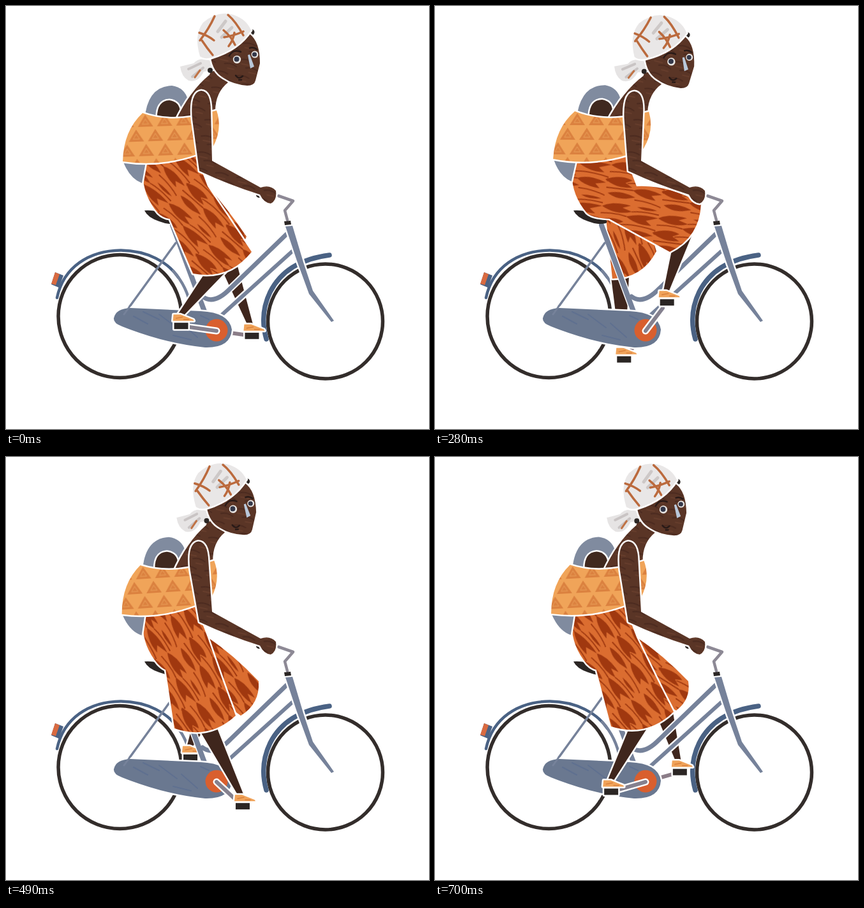
An HTML page that plays this animation: 663x664 px, repeating every 770 ms.

```html
<!DOCTYPE html>
<html lang="en">
<head>
<meta charset="utf-8">
<title>Cyclist</title>
<style>
  html, body { margin: 0; width: 100%; height: 100%; overflow: hidden; background: #fff; }
  svg { display: block; width: 100%; height: 100%; }
  .cut { stroke: #fff; stroke-width: 5; stroke-linejoin: round; paint-order: stroke; }
  .line { fill: none; stroke-linecap: round; stroke-linejoin: round; }
  .steel { stroke: #76829a; }
  .guard { stroke: #4a6284; }
  .black { fill: #2b2624; }
  .skin { fill: url(#skin); }
  .calf { fill: #3f261d; }
  .shoe { fill: #f0a35a; }
</style>
</head>
<body>
<svg viewBox="0 0 663 664">
  <defs>
    <pattern id="skin" width="34" height="26" patternUnits="userSpaceOnUse" patternTransform="rotate(12)">
      <path fill="#5a3526" d="M0 0H34V26H0Z"/>
      <path class="line" stroke="#4b2a1f" stroke-width="2" d="M2 6Q12 2 22 6M14 17Q24 13 33 18"/>
      <path class="line" stroke="#663d2c" stroke-width="2" d="M6 12H18M20 23H30"/>
    </pattern>
    <pattern id="tri" width="30" height="46" patternUnits="userSpaceOnUse" patternTransform="translate(203 170) rotate(-2)">
      <path fill="#f0a459" d="M0 0H30V46H0Z"/>
      <path fill="#db813f" d="M3 20L15 1L27 20ZM-12 43L0 24L12 43ZM18 43L30 24L42 43Z"/>
      <path class="line" stroke="#e59550" stroke-width="1.3" d="M10 16L15 8L20 16ZM-5 39L0 31L5 39ZM25 39L30 31L35 39Z"/>
    </pattern>
    <pattern id="nearCloth" width="90" height="66" patternUnits="userSpaceOnUse"><use href="#leaves"/></pattern>
    <pattern id="farCloth" width="90" height="66" patternUnits="userSpaceOnUse"><use href="#leaves"/></pattern>
    <g id="leaves">
      <path fill="#db6d30" d="M0 0H90V66H0Z"/>
      <g fill="#a0380f">
        <path d="M0 14Q16 2 44 4L32 10L48 13Q24 24 0 14ZM40 22Q62 12 90 14L72 22L82 28Q58 32 40 22Z"/>
        <path d="M-4 38Q18 25 38 31L28 37L40 42Q16 49 -4 38ZM86 38L90 35V41Z"/>
        <path d="M42 46Q60 36 88 43L72 48L80 54Q58 56 42 46ZM4 58Q24 49 48 56L34 61Q18 65 4 58ZM54 4Q70 0 86 3Q70 9 54 4Z"/>
      </g>
      <path class="line" stroke="#a0380f" stroke-width="1.8" d="M0 25Q20 20 40 22M32 37Q56 30 90 34M0 50Q20 48 42 46M48 60Q70 58 90 63M48 13Q66 8 90 9"/>
    </g>
    <g id="foot">
      <path class="cut black" d="M-11 -5H11V5H-11Z"/>
      <path class="cut shoe" d="M-13 -8L-12 -18L-1 -18L19 -10L20 -8Z"/>
      <path class="line" stroke="#d9803c" stroke-width="1.5" d="M-8 -12L2 -14M4 -10H12"/>
    </g>
  </defs>

  <g class="line" stroke="#332d2b" stroke-width="5.5">
    <circle cx="178.500" cy="487" r="96.500"/>
    <circle cx="500.500" cy="495" r="90"/>
  </g>
  <path class="line guard" stroke-width="4.5" d="M80 458C90 410 130 384 180 383.500C222 384 254 402 270 426"/>
  <path class="line steel" stroke-width="4.5" d="M262 416Q284 440 290 474"/>
  <path fill="#4a6284" d="M71 437L77 418L90 423L83 442Z"/>
  <path fill="#d96a40" d="M71 436L77 418L84 421L78 438Z"/>
  <path class="line guard" stroke-width="7.5" stroke-linecap="butt" d="M507 391C460 397 430 417 414 449Q397 484 408 523"/>

  <g id="farLeg">
    <path id="farCrank" class="line" stroke="#8b7d88" stroke-width="6"/>
    <path id="farCalf" class="calf cut"/>
    <use id="farFoot" href="#foot"/>
    <path id="farSkirt" class="cut" fill="url(#farCloth)"/>
  </g>

  <g class="line" stroke="#fff" stroke-width="11">
    <path d="M444 354L352 443Q326 470 308 456M452 382L338 485M262 346L312 482"/>
  </g>
  <g class="line steel">
    <path stroke-width="3.5" d="M266 372L185 484"/>
    <path stroke-width="7" d="M444 354L352 443Q326 470 308 456"/>
    <path stroke-width="6" d="M452 382L338 485"/>
    <path stroke-width="8" d="M261 344L312 482"/>
  </g>
  <path class="cut" fill="#76829a" d="M438 346L449 345L466 402L481 447L514 494L510 496L475 452L456 400Z"/>
  <path class="line" stroke="#8d8995" stroke-width="4.5" d="M441 336L437 321L450 306L427 298"/>
  <path class="black" d="M436 338L446 337L447 343L437 344Z"/>
  <ellipse class="black" cx="397" cy="297" rx="5" ry="4"/>
  <path class="black" d="M217 321Q236 319 262 332Q273 337 268 341Q255 344 240 338Q222 332 217 321Z"/>
  <path class="cut" fill="#6a7890" d="M169 490Q172 475 195 474L305 479Q350 481 354 508Q352 537 312 536Q250 530 182 503Q168 498 169 490Z"/>
  <path class="line" stroke="#5f7090" stroke-width="2" d="M200 487L222 499M240 484L268 505M275 498L300 520M215 480L240 492M262 517L290 524M305 486L318 492"/>
  <path class="line steel" stroke-width="3" d="M200 463L185 484"/>
  <circle cx="330" cy="509" r="17.5" fill="#d95f2e"/>

  <path id="nearCrankEdge" class="line" stroke="#fff" stroke-width="11"/>
  <path id="nearCrank" class="line" stroke="#85818f" stroke-width="6"/>
  <path id="nearCalf" class="calf cut"/>
  <use id="nearFoot" href="#foot"/>
  <path id="nearSkirt" class="cut" fill="url(#nearCloth)"/>

  <g id="body">
    <path class="cut" fill="#808b9f" d="M184 245Q194 271 213 278L219 245Z"/>
    <path class="cut" fill="#808b9f" d="M217 180Q221 126 260 125Q280 128 285 147L272 180Z"/>
    <path class="cut" fill="#40291f" d="M237 180Q235 149 256 148Q272 150 273 166L270 180Z"/>
    <path class="skin cut" d="M265 182Q288 133 319 108L325 90L348 120Q328 136 328 165L331 185Z"/>
    <path class="cut" fill="url(#tri)" d="M183 244Q184 196 214 168Q250 181 292 174L330 164Q340 193 324 222L299 233Q242 253 183 244Z"/>
    <path class="cut" fill="#e6e4e4" d="M323 87Q304 78 294 90L273 95Q275 111 286 117Q301 121 310 103L324 100Z"/>
    <path class="line" stroke="#c9c4c4" stroke-width="4" d="M286 99L305 90M292 111L309 97"/>
    <path class="line" stroke="#c07345" stroke-width="3" d="M296 112L304 101"/>
    <circle class="black" cx="320" cy="101" r="4"/>
    <circle class="black" cx="385" cy="41" r="4.5"/>
    <path class="skin cut" d="M321 81Q356 70 382 44Q398 56 398 90L391 117Q389 125 378 125Q356 123 341 113Q324 103 321 81Z"/>
    <path class="cut" fill="#e9e7e7" d="M304 79Q294 45 309 26Q332 6 357 14Q377 21 384 38Q364 69 322 81Q311 84 304 79Z"/>
    <g class="line">
      <path stroke="#cdc8c7" stroke-width="5" d="M332 40L344 24M338 49L354 34"/>
      <path stroke="#bb6a3d" stroke-width="3.5" d="M303 42Q316 46 326 54M327 16Q318 36 304 54M307 54Q315 66 324 77M341 38Q353 48 359 61M349 63Q356 54 358 42M342 49Q356 47 372 40M348 14Q360 24 372 46"/>
    </g>
    <g fill="#e8e5e2">
      <circle cx="362" cy="84" r="6.2"/><circle cx="390" cy="76" r="5.5"/>
    </g>
    <g fill="#34384a">
      <circle cx="361.500" cy="83.500" r="4"/><circle cx="389.500" cy="76" r="3.600"/>
    </g>
    <path fill="#b9c8da" d="M379 77L382 76L389 95L383 98Z"/>
    <path class="line" stroke="#291a17" stroke-width="2.500" d="M350 78Q356 67 368 72M382 66Q388 64 393 68M360 109Q365 116 371 110M365 116H369"/>
  </g>
  <path id="arm" class="skin cut"/>
</svg>
<script>
const $ = id => document.getElementById(id);
const STEP = 70, STEPS = 11;
const CRANK = [330, 510], ARM_LENGTH = 56, HIP = [265, 300], SWAY_PIVOT = [282, 294];

// Poses of one pedal turn; the steps between them are blended.
const poseSteps = [0, 2, 4, 5, 7, 9, 10, 11];
const crankAngle = [188, 260, 307, 355, 403, 475, 524, 548].map(a => [a]);
const sway = [0, 8, 8.5, 2, -6, -9, -4, 0].map(s => [s]);
const loop = list => [...list, list[0]];
const near = {
  back: loop([[293, 420], [362, 395], [368, 386], [334, 405], [264, 426], [236, 416], [276, 423]]),
  front: loop([[385, 386], [414, 322], [417, 310], [408, 343], [360, 406], [329, 424], [374, 400]])
};
const far = {
  back: loop([[310, 410], [317, 435], [278, 428], [315, 432], [368, 406], [403, 364], [378, 398]]),
  front: loop([[377, 362], [365, 393], [347, 385], [370, 393], [396, 352], [407, 305], [397, 352]]),
  knee: loop([[345, 395], [313, 420], [290, 425], [305, 405], [312, 400], [375, 355], [358, 395]])
};

function poseAt(list, step) {
  const i = poseSteps.findIndex(s => s > step) - 1;
  const u = (step - poseSteps[i]) / (poseSteps[i + 1] - poseSteps[i]);
  return list[i].map((v, j) => v + (list[i + 1][j] - v) * u);
}
const mid = (p, q) => [(p[0] + q[0]) / 2, (p[1] + q[1]) / 2];

// Hem from back to front corner, then the front edge up to the lap.
function skirtEdge(back, front) {
  const lap = [316, 283], [x, y] = mid(back, front), [fx, fy] = mid(front, lap);
  const bulge = [x + (back[1] - front[1]) * .3, y + (front[0] - back[0]) * .3];
  return `L${back}Q${bulge} ${front}Q${fx} ${fy - (390 - front[1]) * .2} ${lap}`;
}

function turnCloth(id, knee) {
  const deg = Math.atan2(knee[1] - HIP[1], knee[0] - HIP[0]) * 180 / Math.PI - 8;
  $(id).setAttribute('patternTransform', `translate(${HIP}) rotate(${deg})`);
}

function calf(knee, ankle, width) {
  const dx = ankle[0] - knee[0], dy = ankle[1] - knee[1], len = Math.hypot(dx, dy);
  const side = ([x, y], w) => [x - dy / len * w, y + dx / len * w];
  return `M${side(knee, width)}L${side(ankle, 4)}L${side(ankle, -4)}L${side(knee, -width)}Z`;
}

function drawLeg(name, pedal, knee, width) {
  const [x, y] = pedal;
  const end = [CRANK[0] + (x - CRANK[0]) * .8, CRANK[1] + (y - CRANK[1]) * .8];
  $(name + 'Crank').setAttribute('d', `M${CRANK}L${end}`);
  $(name + 'Foot').setAttribute('transform', `translate(${pedal})`);
  $(name + 'Calf').setAttribute('d', calf(knee, [x - 2, y - 16], width));
  turnCloth(name + 'Cloth', knee);
}

function draw(step) {
  const angle = poseAt(crankAngle, step)[0] * Math.PI / 180;
  const dx = Math.cos(angle) * ARM_LENGTH, dy = Math.sin(angle) * ARM_LENGTH;

  const back = poseAt(near.back, step), front = poseAt(near.front, step);
  drawLeg('near', [CRANK[0] + dx, CRANK[1] + dy], mid(back, front), 14);
  $('nearCrankEdge').setAttribute('d', $('nearCrank').getAttribute('d'));
  $('nearSkirt').setAttribute('d', `M217 242Q207 288 238 325Q246 333 ${244 + (back[0] - 236) * .22} 334`
    + skirtEdge(back, front) + 'L308 262L301 232Z');

  drawLeg('far', [CRANK[0] - dx, CRANK[1] - dy], poseAt(far.knee, step), 14);
  $('farSkirt').setAttribute('d',
    'M268 334' + skirtEdge(poseAt(far.back, step), poseAt(far.front, step)) + 'Z');

  const lean = poseAt(sway, step)[0] / 210;
  $('body').setAttribute('transform', `rotate(${lean * 180 / Math.PI} ${SWAY_PIVOT})`);
  const leaned = (x, y) => {
    const u = x - SWAY_PIVOT[0], v = y - SWAY_PIVOT[1], c = Math.cos(lean), s = Math.sin(lean);
    return [SWAY_PIVOT[0] + u * c - v * s, SWAY_PIVOT[1] + u * s + v * c];
  };
  $('arm').setAttribute('d', `M303 259L${leaned(292, 178)}Q${leaned(288, 135)} ${leaned(306, 133)}`
    + `Q${leaned(321, 134)} ${leaned(321, 165)}L323 243L399 285Q414 280 423 290Q425 305 415 310`
    + 'Q404 309 398 296Q350 281 303 259Z');
}

function frame() {
  draw(Math.floor(performance.now() / STEP) % STEPS);
  requestAnimationFrame(frame);
}
frame();
</script>
</body>
</html>
```
